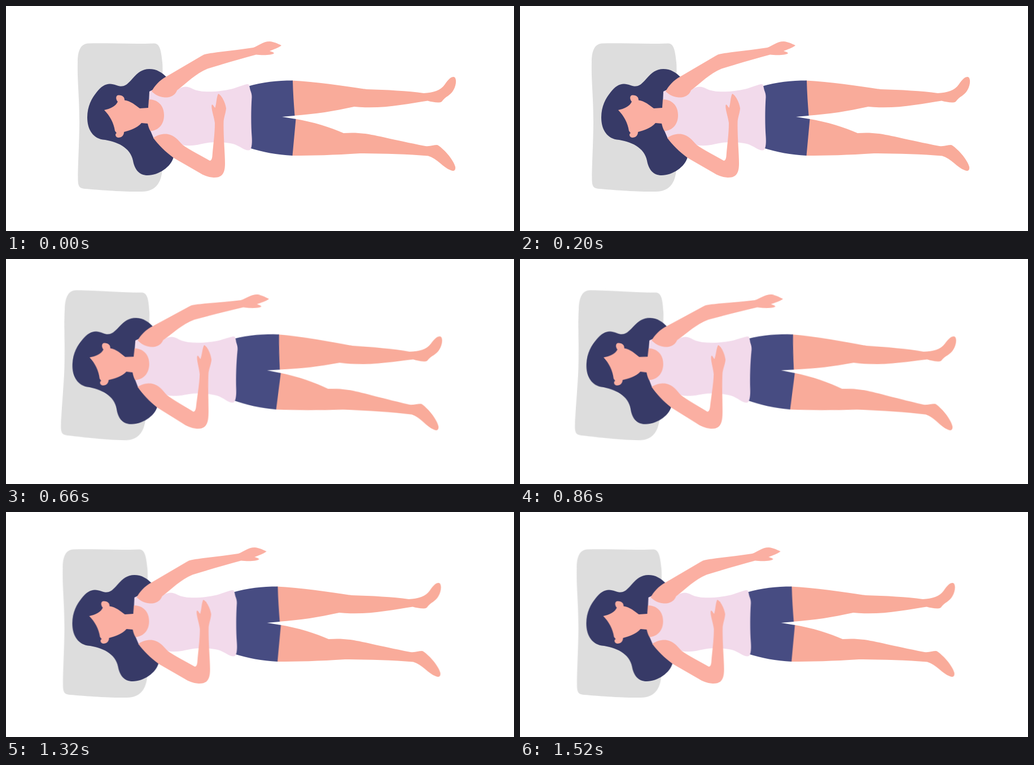
Animation of 900x400 px, one loop 1.65 s. Source, as an HTML page:

```html
<!DOCTYPE html>
<html lang="en">
<head>
<meta charset="utf-8">
<title>Resting</title>
<style>
  html, body { margin: 0; width: 100%; height: 100%; overflow: hidden; background: #fff; }
  svg { display: block; width: 900px; height: 400px; }
  #sleeper { transform-origin: 462px 198px; }
  .pillow { fill: #ddd; }
  .hair { fill: #373a67; }
  .skin { fill: #fbafa2; }
  .leg { fill: #f9ab9a; }
  .shirt { fill: #f2daeb; }
  .shorts { fill: #474c82; }
</style>
</head>
<body>
<svg viewBox="0 0 900 400">
  <g id="sleeper">
    <path class="pillow" d="M127 100C127 84 130 67 146 66.5C180 65.5 220 68 262 66.5C274 66 275 84 277 100C278.5 115 276 160 276 200C276 240 278 280 277 290C275 318 262 330 240 330C205 330.5 165 327 140 325C131 324 128 322 127.5 310C127 290 130 240 130 205C130 160 126 130 127 100Z"/>
    <path class="hair" d="M144 198C144 178 152 164 160 154C168 143 176 138.500 184 138.500C193 138.500 198 143.500 206 142.500C222 141 228 112 254 112C267 112 276 118 285 127L275 160V240L297 268C293 286 270 301 251 301C236 301 228 291 225 275C221 252 196 240 171 237.500C152 234 144 217 144 198Z"/>

    <!-- legs -->
    <path class="leg" d="M506 132.500C550 135 600 142 638 148C675 149 712 151 740 155C757 154 770 150 777 140C784 130 788 126 793 126C799 127 798 140 793 149C787 160 779 160 772 170C768 173 756 171 747 168.500C710 174 665 184 617 179C580 187 550 192 509 195Z"/>
    <path class="leg" d="M511 200.500C545 206 575 216 598 226C640 223 655 232 743 249C752 250 757 247 764 247C774 252 793 273 796 286C797 293 793 294 788 292C774 287 764 271 748 266.500C710 263.500 665 262 627 262C580 265 545 266 506 266Z"/>
    <path class="shorts" d="M428 143C455 135 480 132.500 508 132.500C508.500 155 510 175 511.500 195L489 197L513.500 201L507.500 266C480 264.500 455 260 430 252Z"/>

    <!-- torso -->
    <path class="shirt" d="M254 152L262 148L303 150C312 142 321 142 330 147C345 155 375 153 400 147.500C412 144 421 140 427 139C430 138.500 431 140 432 146C433 152 435.500 154 435.500 162C434 185 434 212 435.500 232C436.500 246 435 256.500 430 256.500C422 257 415 249 402 245C385 241 365 241 345 245.500C333 248.500 322 249 312 247L262 236L256 222L252 195Z"/>
    <path class="skin" d="M253 166C269 166 280 177 280 194C280 211 270 221 256 222.500C253 218 252 213 251 209L240 208C232 217 220 221 209 224C209 230 205 234 199 234C193 233 193 227 196 226L193 222C191 208 184 195 174 185C184 183 195 178 198 170C194 166 194 158 200 158.500C207 159 210 162 210 167.500C221 169 229 176 237 182L252 181Z"/>

    <!-- raised arm -->
    <path class="skin" d="M258 152C263 142 272 132 284 125.500L346 89C352 85 358 84.500 366 83.500C390 80 415 77.500 438 74C447 71 455 63 467 63C475 63.500 481 67 488 70C482 75 474 77 467 80C471 81.500 474 82 475 84C471 88 452 87.500 443 86.500C415 94 385 103 357 111.500C335 121 321 136 303 150C299 160 290 163 281 162.500C271 162 264 157 258 152Z"/>

    <!-- bent arm -->
    <path class="skin" d="M261 234.500C268 229 276 227 285 227.500C300 230 305 239 313 247C326 256 345 266 361 275C364 275 365 271 365.500 267C367 247 370 228 370 208C369 198 363 183 364.500 176C366 173 368 179 370.500 181C373 173 373 161 376 156C382 158 389 173 390 182C389 192 385.500 199 385.500 207C385 232 388 262 388 280C388 299 382 305 368 305C357 304 350 301 342 296L297 270C282 259 270 247 261 234.500Z"/>
  </g>
</svg>
<script>
  const HOLD = 330;
  // [shift in px, tilt in degrees] for each held pose
  const poses = [[0, 0], [-26.5, 1], [-26.5, 2], [-26.5, 1], [-26.5, 0]];

  const sleeper = document.getElementById('sleeper');
  const steps = [...poses, poses[0]].map(([x, tilt], i) => ({
    transform: `translate(${x}px, 0px) rotate(${tilt}deg)`,
    offset: i / poses.length,
    easing: 'step-end'
  }));
  sleeper.animate(steps, { duration: HOLD * poses.length, iterations: Infinity });
</script>
</body>
</html>
```
